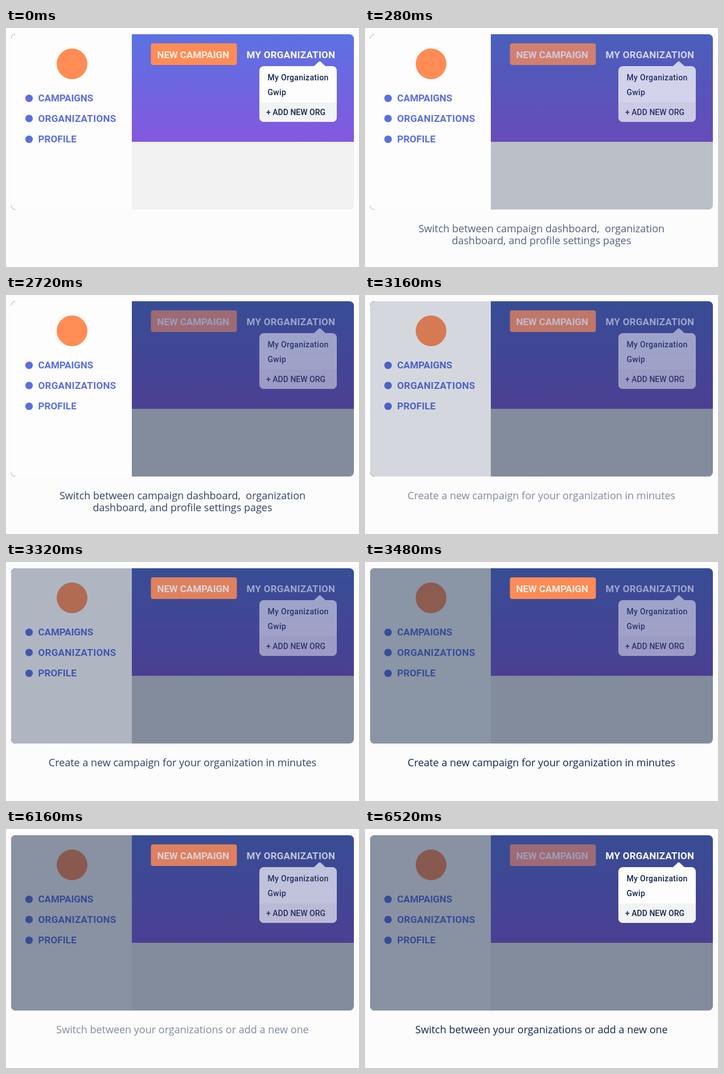
These frames come from a looping animation (620 by 420 pixels, 8000 ms). An HTML page:

```html
<!DOCTYPE html>
<html lang="en">
<head>
<meta charset="utf-8">
<title>Dashboard tour</title>
<style>
  html, body { margin: 0; width: 100%; height: 100%; overflow: hidden; background: #fcfcfc; }
  svg { display: block; width: 620px; height: 420px; }
  text { white-space: pre; }
  .head { font: 700 17px Roboto, sans-serif; }
  .menu { font: 500 14px Roboto, sans-serif; letter-spacing: .3px; fill: #14254a; }
  .caption { font: 400 18px "Open Sans", sans-serif; fill: #14264c; text-anchor: middle; }
</style>
</head>
<body>
<svg viewBox="0 0 620 420">
  <defs>
    <linearGradient id="sky" x1="0" y1="0" x2="0" y2="1">
      <stop offset="0" stop-color="#5b72e2"/>
      <stop offset="1" stop-color="#8358de"/>
    </linearGradient>
    <clipPath id="card"><rect x="9" y="11" width="602" height="308" rx="8"/></clipPath>
    <clipPath id="panel"><rect x="445" y="67" width="136" height="98" rx="8"/></clipPath>
  </defs>
  <rect width="620" height="420" fill="#fcfcfc"/>

  <g clip-path="url(#card)">
    <rect x="221" y="11" width="390" height="189" fill="url(#sky)"/>
    <rect x="221" y="200" width="390" height="119" fill="#f2f2f2"/>
    <rect id="mainShade" x="221" y="11" width="390" height="308" fill="#14294b" opacity="0"/>

    <rect x="9" y="11" width="212" height="308" fill="#fdfdfd"/>
    <circle cx="116" cy="63" r="27" fill="#ff8c55"/>
    <g class="head" fill="#5b6ee1">
      <circle cx="40.5" cy="123.5" r="6.6"/>
      <circle cx="40.5" cy="159" r="6.6"/>
      <circle cx="40.5" cy="195.5" r="6.6"/>
      <text x="56.5" y="129.3" letter-spacing="-.1">CAMPAIGNS</text>
      <text x="56.5" y="164.8" letter-spacing=".3">ORGANIZATIONS</text>
      <text x="56.5" y="201.3" letter-spacing=".1">PROFILE</text>
    </g>
    <rect id="sideShade" x="9" y="11" width="212" height="308" fill="#14294b" opacity="0"/>
  </g>
  <path d="M9 18.5Q9.5 11.5 16.5 11M9 311.5Q9.5 318.5 16.5 319" fill="none" stroke="#888" stroke-width=".7"/>

  <g id="button">
    <rect x="254.5" y="27" width="151" height="38" rx="4" fill="#ff8c55"/>
    <text class="head" x="265.5" y="53" fill="#ffeee6" letter-spacing="-.1">NEW CAMPAIGN</text>
  </g>

  <g id="org">
    <text class="head" x="422.5" y="53" fill="#fff" letter-spacing=".25">MY ORGANIZATION</text>
    <path d="M540.5 67.5L549 59.5Q551 57.5 553 59.5L561.5 67.5Z" fill="#fdfdfd"/>
    <g clip-path="url(#panel)">
      <rect x="445" y="67" width="136" height="98" fill="#fdfdfd"/>
      <rect x="445" y="131" width="136" height="34" fill="#f2f3f5"/>
    </g>
    <g class="menu">
      <text x="459.5" y="92">My Organization</text>
      <text x="459.5" y="118">Gwip</text>
      <text x="457" y="153" style="letter-spacing:0">+ ADD NEW ORG</text>
    </g>
  </g>

  <g class="caption">
    <g id="tip0" opacity="0">
      <text x="310" y="358.5" xml:space="preserve">Switch between campaign dashboard,  organization</text>
      <text x="310" y="380">dashboard, and profile settings pages</text>
    </g>
    <text id="tip1" x="310" y="358.5" opacity="0">Create a new campaign for your organization in minutes</text>
    <text id="tip2" x="310" y="358.5" opacity="0">Switch between your organizations or add a new one</text>
  </g>
</svg>
<script>
  const LOOP = 8000, FADE_IN = 510, FADE_OUT = 300, SHADE = 0.5;
  const starts = [20, 2980, 5980];

  const ramp = (t, from, span) => Math.min(1, Math.max(0, (t - from) / span));
  const setOpacity = (id, value) =>
    document.getElementById(id).setAttribute('opacity', value.toFixed(4));

  function draw(t) {
    const [a, b, c] = starts.map(s => ramp(t, s, FADE_IN));

    setOpacity('mainShade', SHADE * a);
    setOpacity('sideShade', SHADE * b);
    setOpacity('button', 1 - SHADE * (a - b + c));
    setOpacity('org', 1 - SHADE * (a - c));

    [a, b, c].forEach((p, i) => {
      const next = starts[i + 1] ?? Infinity;
      const gone = next < Infinity ? ramp(t, next - FADE_OUT, FADE_OUT) : 0;
      setOpacity('tip' + i, Math.sin(p * Math.PI / 2) * (1 - gone));
    });
  }

  const begin = performance.now();
  function tick() {
    draw((performance.now() - begin) % LOOP);
    requestAnimationFrame(tick);
  }
  draw(0);
  requestAnimationFrame(tick);
</script>
</body>
</html>
```
